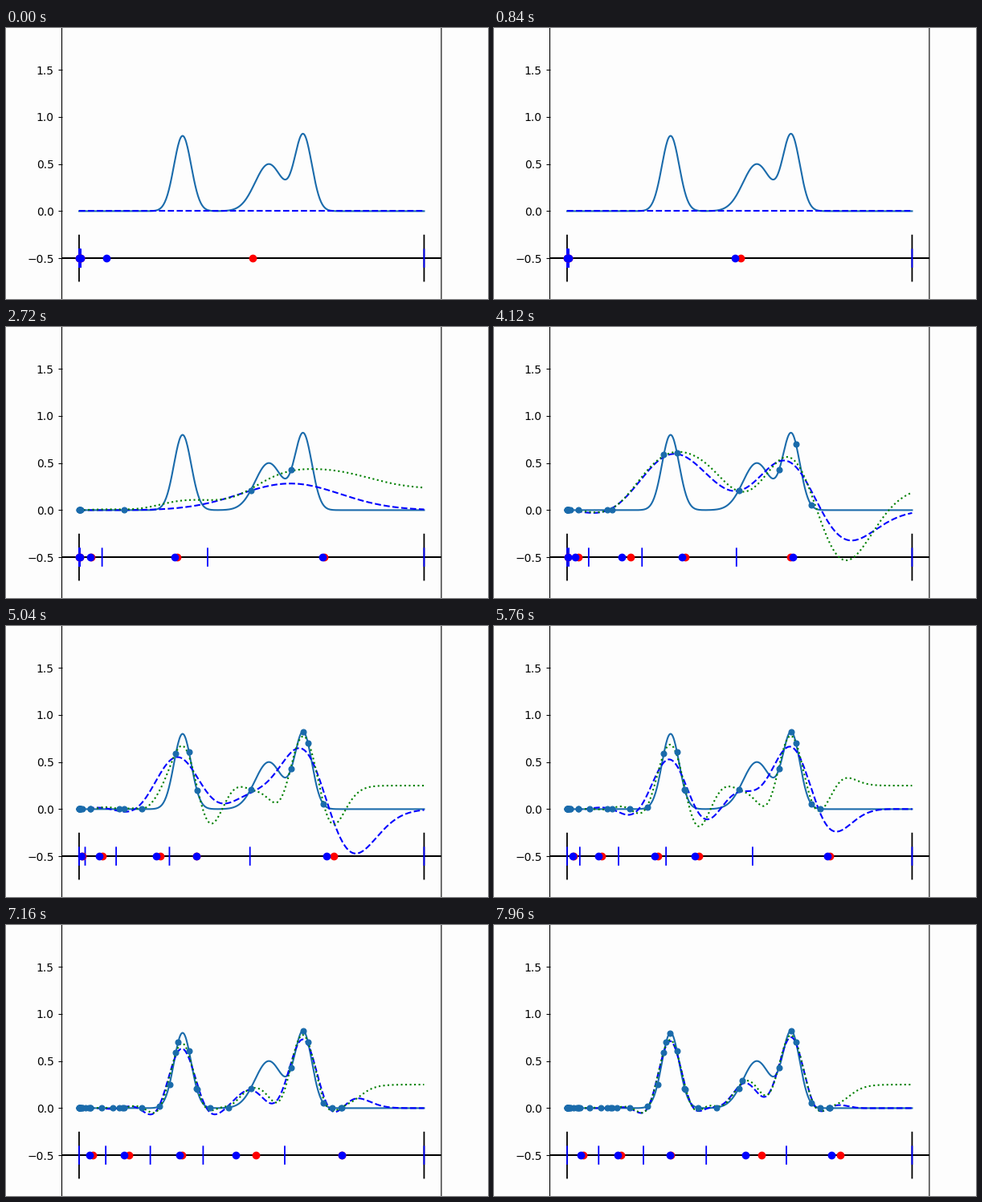
Recreate the animation shown at these times as a matplotlib script. Size 600 by 338 pixels, loop 8000 ms.

```python
import numpy as np
import matplotlib.pyplot as plt
from matplotlib.animation import FuncAnimation

FRAMES, INTERVAL = 200, 40
W, H, DPI = 600, 338, 100
GAIN = 0.16            # share of the remaining way covered per frame
Y_ZERO, Y_UNIT = 228.4, 117.4
CURVE = "#1a6bab"

# frame at which each round of sensing begins
STARTS = [-1, 28, 49, 73, 97, 117, 136, 156, 177, 198]

xs = np.linspace(0, 1, 500)


def bell(x, mid, width):
    return np.exp(-.5 * ((x - mid) / width) ** 2)


def field(x):
    return .8 * bell(x, .3, .025) + .5 * bell(x, .55, .04) + .8 * bell(x, .65, .025)


def regress(x, seen, length, noise):
    """Gaussian process mean and relative variance at x."""
    if not len(seen):
        return 0 * x, 1 + 0 * x
    cov = bell(seen[:, None], seen, length) + noise * np.eye(len(seen))
    cross = bell(x[:, None], seen, length)
    gain = np.linalg.solve(cov, cross.T).T
    return gain @ field(seen), 1 - (gain * cross).sum(axis=1)


def length_at(e):
    return .042 if e < 2 else .2 * .85 ** e


def estimate(x, seen, e):
    noise = .05 + 4 * .12 ** (e - 1)
    return regress(x, seen, length_at(e), noise)[0]


def upper(x, seen, e):
    """Estimate with little smoothing, raised where little is known."""
    length = length_at(e) if e < 5 else .05
    noise = .02 + 4 * .005 ** (e - 1)
    spread = .25 - .17 * .15 ** (e - 1)
    mean, var = regress(x, seen, length, noise)
    return mean + spread * var


def centroid(lo, hi, seen, e):
    x = np.linspace(lo, hi, 200)
    weight = np.maximum(upper(x, seen, e), .01) if e else np.ones(200)
    return (x * weight).sum() / weight.sum()


def reach(steps):
    return 1 - np.exp(-GAIN * steps)


def plan():
    """Each round: sense, split the line between agents, head for the centroids."""
    rounds = []
    pos, seen = np.array([0, .0015, .003, .004, .005]), np.array([])
    for e, start in enumerate(STARTS):
        if e:
            last = rounds[-1]
            pos = pos + (last["goal"] - pos) * reach(start - STARTS[e - 1])
            seen = np.concatenate([seen, pos])
        edges = np.concatenate([[0], (pos[1:] + pos[:-1]) / 2, [1]])
        goal = np.array([centroid(a, b, seen, e) for a, b in zip(edges, edges[1:])])
        rounds.append(dict(
            pos=pos, seen=seen, edges=edges, goal=goal,
            mean=estimate(xs, seen, e) if e else 0 * xs,
            bound=upper(xs, seen, e) if e else np.nan * xs))
    return rounds


ROUNDS = plan()

fig = plt.figure(figsize=(W / DPI, H / DPI), dpi=DPI, facecolor="#fdfdfd")
ax = fig.add_axes([69.5 / W, 0, 472.4 / W, 1], facecolor="#fdfdfd")
ax.set_xlim(-.05, 1.05)
ax.set_ylim((Y_ZERO - H) / Y_UNIT, Y_ZERO / Y_UNIT)
ax.set_xticks([])
ax.set_yticks([-.5, 0, .5, 1, 1.5])
ax.tick_params(labelsize=10, labelfontfamily="DejaVu Sans")
for side in ("top", "bottom"):
    ax.spines[side].set_visible(False)
for side in ("left", "right"):
    ax.spines[side].set_snap(False)

ax.plot(xs, field(xs), color=CURVE, lw=1.5, zorder=2)
ax.axhline(-.5, color="black", lw=1.5, zorder=2)
for end in (0, 1):
    ax.plot([end, end], [-.75, -.25], color="black", lw=1.3,
            solid_capstyle="butt", snap=False, zorder=3)

mean_line, = ax.plot([], [], "--", color="blue", lw=1.5, zorder=3)
bound_line, = ax.plot([], [], ":", color="green", lw=1.5, zorder=3)
samples, = ax.plot([], [], "o", color=CURVE, ms=5, mew=.8, zorder=5)
walls, = ax.plot([], [], color="blue", lw=1.3, solid_capstyle="butt",
                 snap=False, zorder=4)
targets, = ax.plot([], [], "o", color="red", ms=6, zorder=6)
agents, = ax.plot([], [], "o", color="blue", ms=6, zorder=7)


def draw(frame):
    e = sum(s <= frame for s in STARTS) - 1
    now = ROUNDS[e]
    pos = now["pos"] + (now["goal"] - now["pos"]) * reach(frame - STARTS[e])
    level = np.full(len(pos), -.5)

    mean_line.set_data(xs, now["mean"])
    bound_line.set_data(xs, now["bound"])
    samples.set_data(now["seen"], field(now["seen"]))
    edges = now["edges"]
    walls.set_data(np.repeat(edges, 3), np.tile([-.6, -.4, np.nan], len(edges)))
    targets.set_data(now["goal"], level)
    agents.set_data(pos, level)
    return mean_line, bound_line, samples, walls, targets, agents


def reset():
    return draw(0)


anim = FuncAnimation(fig, draw, frames=FRAMES, init_func=reset,
                     interval=INTERVAL, repeat=True, repeat_delay=0)
plt.show()
```
